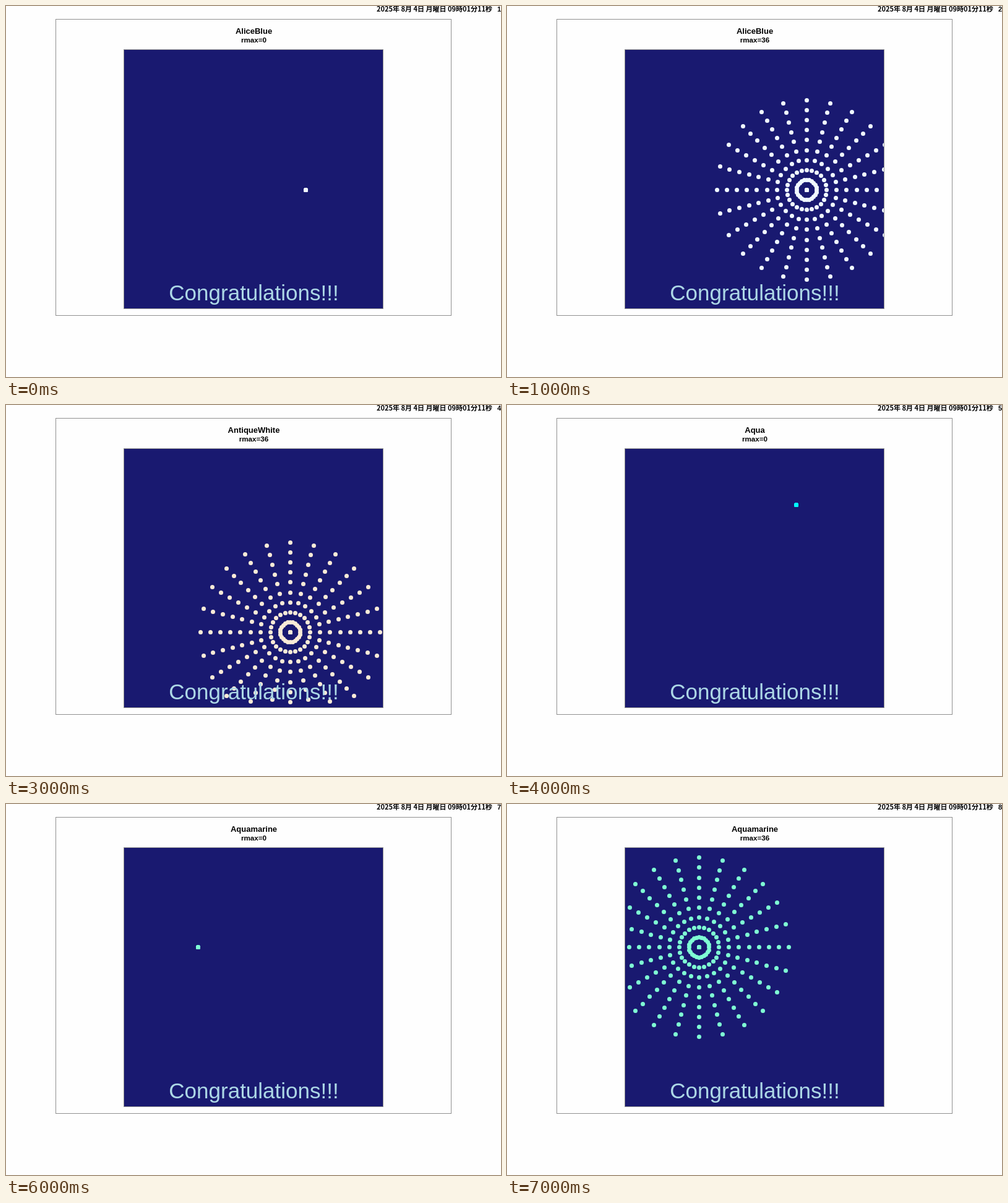
Animation of 800x600 px, one loop 8 s. Source, as an HTML page with a canvas:

```html
<!DOCTYPE html>
<html lang="ja">
<meta charset="utf-8">
<style>
  html, body { margin: 0; width: 100%; height: 100%; overflow: hidden; background: #fefefe; }
  canvas { display: block; }
</style>
<canvas width="800" height="600"></canvas>
<script>
const ctx = document.querySelector('canvas').getContext('2d');
const SANS = '"Liberation Sans", Arial, sans-serif';
const bursts = [
  { color: 'AliceBlue', x: 484.5, y: 297.5 },
  { color: 'AntiqueWhite', x: 459.5, y: 367.5 },
  { color: 'Aqua', x: 467.5, y: 161.5 },
  { color: 'Aquamarine', x: 310.5, y: 231.9 }
];
const RAYS = 24, RING_STEP = 4, UNIT = 4.03;

function text(str, x, y, font, align = 'center', color = '#000') {
  ctx.font = font;
  ctx.textAlign = align;
  ctx.fillStyle = color;
  ctx.fillText(str, x, y);
}

function box(x, y, size, height = size) {
  ctx.strokeStyle = '#909090';
  ctx.strokeRect(x + .5, y + .5, size, height);
}

// Dots sit on whole pixels
function dot(x, y) {
  ctx.beginPath();
  ctx.arc(Math.floor(x) + .5, Math.floor(y) + .5, 3.5, 0, 2 * Math.PI);
  ctx.fill();
}

function drawBurst({ color, x, y }, rmax) {
  ctx.save();
  ctx.beginPath();
  ctx.rect(191, 71, 418, 418);
  ctx.clip();
  ctx.fillStyle = color;
  for (let r = 0; r <= rmax; r += RING_STEP) {
    for (let i = 0; i < RAYS; i++) {
      const a = i / RAYS * 2 * Math.PI;
      dot(x + r * UNIT * Math.cos(a), y + r * UNIT * Math.sin(a));
    }
  }
  ctx.restore();
}

function draw(page) {
  const burst = bursts[page >> 1];
  const rmax = page % 2 ? 36 : 0;
  ctx.fillStyle = '#fefefe';
  ctx.fillRect(0, 0, 800, 600);
  text('2025年 8月 4日 月曜日 09時01分11秒', 599, 9, 'bold 11px "Noto Sans CJK JP", "Noto Sans CJK", sans-serif', 'left');
  text(page + 1, 794, 9, `bold 11px ${SANS}`, 'left');
  box(80, 21, 639, 479);
  text(burst.color, 400.5, 45, `bold 13px ${SANS}`);
  text(`rmax=${rmax}`, 400.5, 59, `bold 11.67px ${SANS}`);
  ctx.fillStyle = 'MidnightBlue';
  ctx.fillRect(190, 70, 420, 420);
  drawBurst(burst, rmax);
  box(190, 70, 419);
  text('Congratulations!!!', 400.5, 476, `35px ${SANS}`, 'center', 'LightBlue');
}

function tick() {
  draw(Math.floor(performance.now() / 1000) % 8);
  requestAnimationFrame(tick);
}
tick();
</script>
</html>
```
